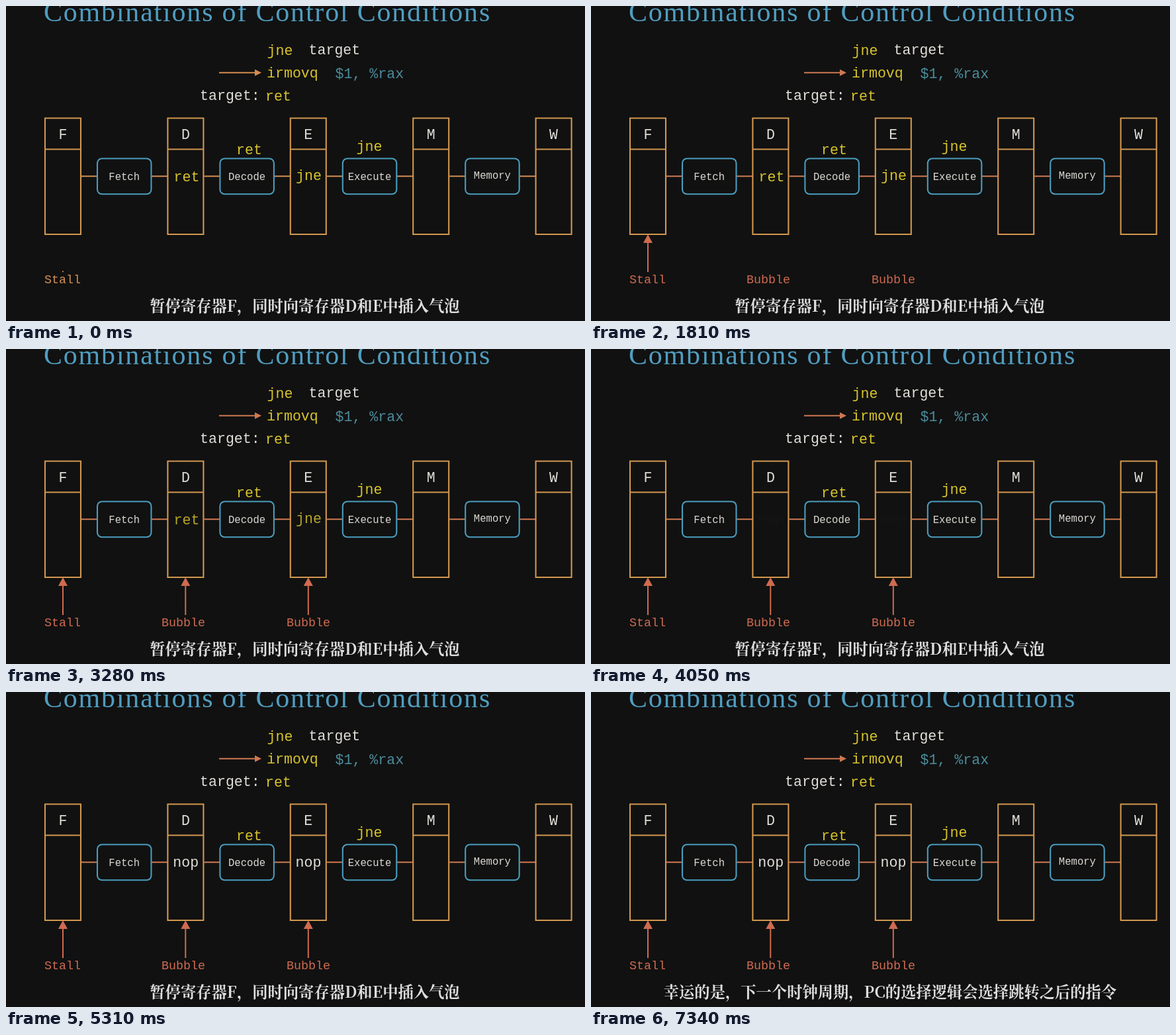
An HTML page for the animation above (8000 ms loop, 875 by 476 pixels).

```html
<!DOCTYPE html>
<html lang="zh-Hans">
<head>
<meta charset="utf-8">
<title>Pipeline control conditions</title>
<style>
  html, body { margin: 0; width: 100%; height: 100%; overflow: hidden; background: #111; }
  svg { display: block; width: 875px; height: 476px; }
  text { white-space: pre; }
  .title { font: 42px "Liberation Serif", serif; letter-spacing: 1.8px; fill: #509dc0; }
  .code { font: 21.6px "Liberation Mono", monospace; }
  .stage { font: 15.6px "Liberation Mono", monospace; fill: #dcd9d4; text-anchor: middle; }
  .action { font: 18.4px "Liberation Mono", monospace; text-anchor: middle; fill: var(--warm); }
  .caption { font: 600 23.3px "Noto Serif CJK SC", "Noto Serif", "Noto Sans CJK SC", serif; fill: #dedede; text-anchor: middle; }
  .mid { text-anchor: middle; }
  .yellow { fill: #d8c42c; }
  .white { fill: #e2dfd9; }
  .teal { fill: #4b8c9c; }
  .register { fill: none; stroke: #d2974f; stroke-width: 2.1; }
  .unit { fill: none; stroke: #4a9dbe; stroke-width: 2.1; }
  .wire { fill: none; stroke: var(--wire); stroke-width: 2; }
  .shaft { fill: none; stroke: var(--warm); stroke-width: 2; }
  .tip { fill: var(--warm); }
</style>
</head>
<body>
<svg id="scene" viewBox="0 0 875 476"></svg>
<script>
const LOOP = 8000;
const STEP = 1000;
const START = -60; // the first arrow is already under way
const CAPTION_CHANGE = 6080;
const scene = document.getElementById('scene');

function add(tag, attrs, text = '') {
  const el = document.createElementNS('http://www.w3.org/2000/svg', tag);
  for (const key in attrs) el.setAttribute(key, attrs[key]);
  el.textContent = text;
  return scene.appendChild(el);
}
const label = (text, x, y, cls) => add('text', { x, y, class: cls }, text);
const path = (d, cls) => add('path', { d, class: cls });

label('Combinations of Control Conditions', 57, 22.5, 'title');

// Program listing
label('jne', 394.5, 73.5, 'code yellow');
label('target', 457.5, 73, 'code white');
label('irmovq', 394, 107.5, 'code yellow');
label('$1, %rax', 497.5, 109, 'code teal');
label('target:', 293, 142, 'code white');
label('ret', 392, 142.5, 'code yellow');
path('M322 100.8H377', 'wire');
add('path', { d: 'M386 100.8L376 95.8V105.8Z', fill: 'var(--wire)' });

// Pipeline
const PITCH = 185.4;
const units = ['Fetch', 'Decode', 'Execute', 'Memory'];
[...'FDEMW'].forEach((name, i) => {
  const x = 59 + i * PITCH;
  path(`M${x} 169.5h54v175.5h-54zM${x} 216.5h54`, 'register');
  label(name, x + 27, 201, 'code white mid');
  if (!units[i]) return;
  path(`M${x + 55} 257.3h24M${x + 161} 257.3h24`, 'wire');
  add('rect', { x: x + 79, y: 230.5, width: 81.5, height: 53.7, rx: 7, class: 'unit' });
  label(units[i], x + 119.7, i === 3 ? 261 : 262.5, 'stage');
});
label('ret', 367.5, 223.5, 'code yellow mid');
label('jne', 549, 218.5, 'code yellow mid');

const held = [
  label('ret', 273, 264.5, 'code yellow mid'),
  label('jne', 457.5, 262.5, 'code yellow mid')
];
const nops = [271.7, 457].map(x => label('nop', x, 264, 'code white mid'));

label('Stall', 85.5, 418.5, 'action');
const bubbles = [268, 457].map(x => label('Bubble', x, 418.5, 'action'));
const arrows = [86, 271.3, 456.8].map(x => ({
  x, shaft: path('', 'shaft'), tip: path('', 'tip')
}));

const captions = [
  label('暂停寄存器F，同时向寄存器D和E中插入气泡', 451.5, 462, 'caption'),
  label('幸运的是，下一个时钟周期，PC的选择逻辑会选择跳转之后的指令', 452, 462, 'caption')
];

const clamp = v => Math.min(1, Math.max(0, v));
const sigmoid = v => 1 / (1 + Math.exp(-v));
const EDGE = sigmoid(-5);
const smooth = v => clamp((sigmoid(10 * (v - 0.5)) - EDGE) / (1 - 2 * EDGE));
const progress = (t, n) => smooth(clamp((t - START) / STEP - n));

// The shaft is traced in the first half, the outline of the tip in the second.
function traceArrow({ x, shaft, tip }, p) {
  const length = p > 0 ? Math.max(1.5, 44 * clamp(p * 2)) : 0;
  shaft.setAttribute('d', length ? `M${x} 402v${-length}` : '');
  const along = clamp(p * 2 - 1) * 3;
  const corners = [[x, 345], [x - 7, 358], [x + 7, 358], [x, 345]];
  const side = Math.min(2, Math.floor(along));
  const [a, b] = [corners[side], corners[side + 1]];
  const end = a.map((v, k) => v + (b[k] - v) * (along - side));
  tip.setAttribute('d', 'M' + [...corners.slice(0, side + 1), end].join('L') + 'Z');
}

const fade = (els, opacity) => els.forEach(el => el.setAttribute('opacity', opacity));

function render(t) {
  const warm = t < 450 ? '#d59152' : t < 1740 ? '#e0735a' : '#cf6b50';
  scene.style.setProperty('--warm', warm);
  scene.style.setProperty('--wire', t < 1740 ? '#d58c4f' : '#cf7852');
  arrows.forEach((arrow, i) => traceArrow(arrow, progress(t, i ? 2 : 0)));
  fade(bubbles, progress(t, 1));
  fade(held, 1 - progress(t, 3));
  fade(nops, progress(t, 4));
  const late = t >= CAPTION_CHANGE;
  fade([captions[0]], late ? 0 : 1);
  fade([captions[1]], late ? 1 : 0);
}

const origin = performance.now();
function tick() {
  render((performance.now() - origin) % LOOP);
  requestAnimationFrame(tick);
}
tick();
</script>
</body>
</html>
```
